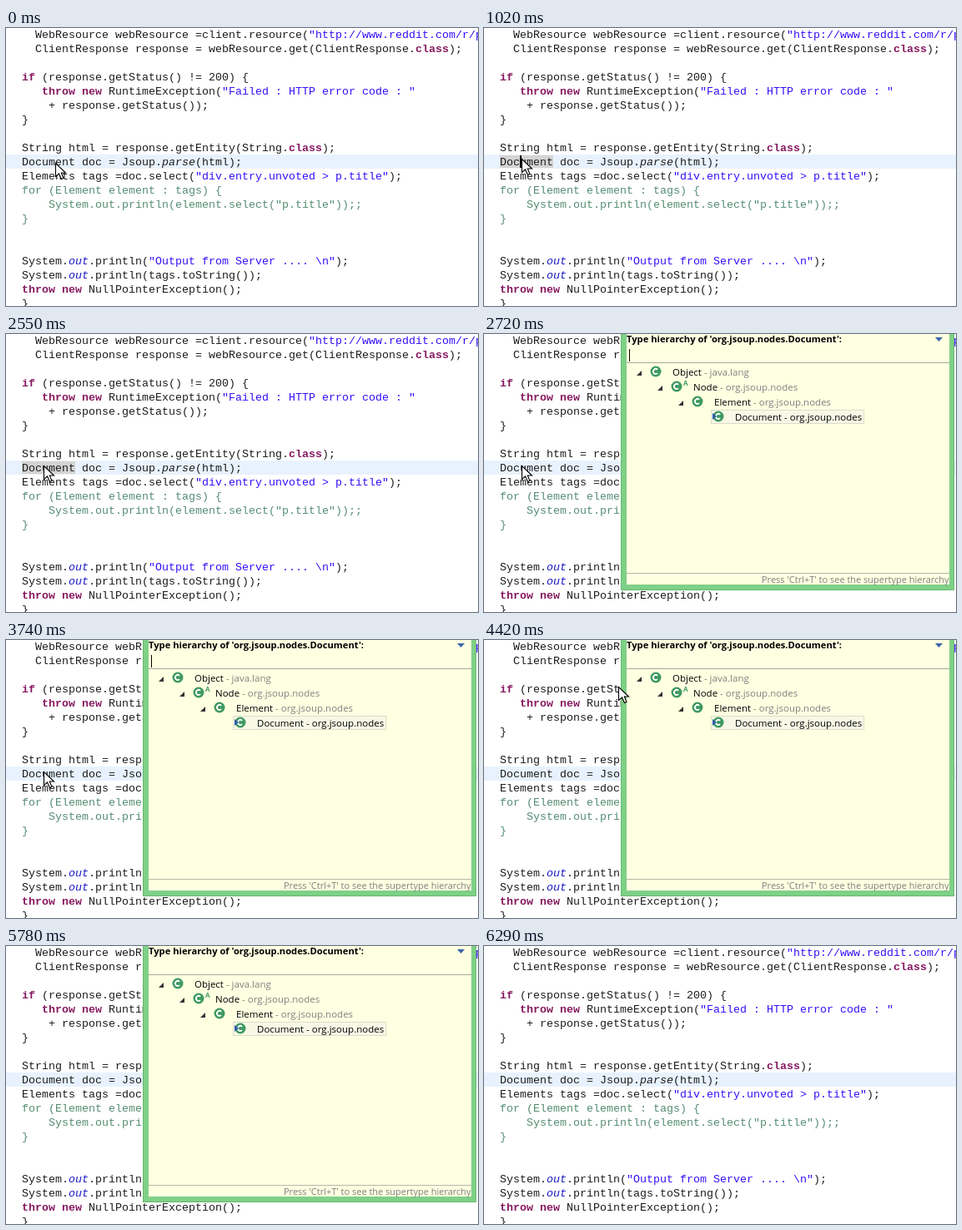
Animation of 566x334 px, one loop 6970 ms. Source, as an HTML page with a canvas:

```html
<!DOCTYPE html>
<html lang="en">
<head>
<meta charset="utf-8">
<title>Type hierarchy popup</title>
<style>
  html, body { margin: 0; width: 100%; height: 100%; overflow: hidden; background: #fff; }
  canvas { display: block; }
</style>
</head>
<body>
<canvas width="566" height="334"></canvas>
<script>
const ctx = document.querySelector('canvas').getContext('2d');
const LOOP = 6970, STEP = 170, ROW = 17, CHAR = 8;
const CLICK = 600, MARK = 1020, OPEN = 2720, CLOSE = 6120;
const MONO = '13.333px "Liberation Mono", monospace';
const SANS = '"Open Sans", sans-serif';
const INK = '#1c1c1c', KEYWORD = '#86195f', STRING = '#3310f8', STATIC = '#1c1cc4', COMMENT = '#558c73';

const code = String.raw`  WebResource webResource =client.resource("http://www.reddit.com/r/p
  ClientResponse response = webResource.get(ClientResponse.class);

if (response.getStatus() != 200) {
   throw new RuntimeException("Failed : HTTP error code : "
    + response.getStatus());
}

String html = response.getEntity(String.class);
Document doc = Jsoup.parse(html);
Elements tags =doc.select("div.entry.unvoted > p.title");
for (Element element : tags) {
    System.out.println(element.select("p.title"));;
}


System.out.println("Output from Server .... \n");
System.out.println(tags.toString());
throw new NullPointerException();
}`.split('\n');
const tokens = /"[^"]*"?|\b(?:if|throw|new|class|out|parse)\b|[^"\s\w]+|\w+/g;

const tree = [
  ['Object', 'java.lang'],
  ['Node', 'org.jsoup.nodes'],
  ['Element', 'org.jsoup.nodes'],
  ['Document', 'org.jsoup.nodes']
];

// time, x, y of the pointer tip
const track = [
  [0, 59, 162], [170, 59, 162], [680, 45, 157], [2720, 45, 158], [3740, 45, 158],
  [4760, 201, 20], [5270, 230, 105], [5610, 195, 340], [LOOP, 195, 340]
];

function rect(color, x, y, w, h) {
  ctx.fillStyle = color;
  ctx.fillRect(x, y, w, h);
}

function text(str, x, y, color, font) {
  ctx.font = font;
  ctx.fillStyle = color;
  ctx.fillText(str, x, y);
  return x + ctx.measureText(str).width;
}

function polygon(color, x, y, points) {
  ctx.beginPath();
  for (let i = 0; i < points.length; i += 2) ctx.lineTo(x + points[i], y + points[i + 1]);
  ctx.closePath();
  ctx.fillStyle = color;
  ctx.fill();
}

function pointerAt(t) {
  const i = track.findIndex(p => p[0] > t);
  const [t0, x0, y0] = track[i - 1], [t1, x1, y1] = track[i];
  const u = (t - t0) / (t1 - t0), k = u * u * (3 - 2 * u);
  return { x: Math.round(x0 + (x1 - x0) * k), y: Math.round(y0 + (y1 - y0) * k) };
}

const caretOn = (t, start) => t >= start && (t - start) % 1060 < 530;

function tokenStyle(token) {
  if (token[0] === '"') return [STRING, ''];
  if (/^(if|throw|new|class)$/.test(token)) return [KEYWORD, 'bold '];
  if (token === 'out') return [STATIC, 'italic '];
  return [INK, token === 'parse' ? 'italic ' : ''];
}

function drawCode(t) {
  rect('#e8f2fe', 0, 152, 566, ROW);
  if (t >= MARK && t < OPEN) rect('#d4d4d4', 19, 153, 64, 15);
  code.forEach((line, row) => {
    const comment = row > 10 && row < 14;
    for (const match of line.matchAll(tokens)) {
      const [color, style] = comment ? [COMMENT, ''] : tokenStyle(match[0]);
      text(match[0], 19 + CHAR * match.index, 12 + ROW * row, color, style + MONO);
    }
  });
  if (t < OPEN && caretOn(t, CLICK)) rect('#000', 43, 153, 2, 15);
}

function drawClassIcon(x, y) {
  ctx.beginPath();
  ctx.arc(x, y, 6.5, 0, 7);
  ctx.fillStyle = '#3f9a62';
  ctx.fill();
  ctx.beginPath();
  ctx.arc(x, y, 3, 0.8, 5.5);
  ctx.strokeStyle = '#fff';
  ctx.lineWidth = 1.8;
  ctx.stroke();
}

function drawTreeRow([name, pack], i, selected) {
  const x = 25 * i, y = 18 * i, font = '11.5px ' + SANS;
  if (selected) {
    ctx.font = font;
    const width = 31 + ctx.measureText(name + ' - ' + pack).width;
    rect('#f8f8e6', 197 + x, 38 + y, width, 16);
    ctx.strokeStyle = '#dcdccb';
    ctx.lineWidth = 1;
    ctx.strokeRect(197.5 + x, 37.5 + y, width, 16);
  }
  if (i < 3) polygon('#333', 183 + x, 44 + y, [6, 0, 6, 6, 0, 6]);
  drawClassIcon(206 + x, 45 + y);
  if (i === 1) text('A', 239, 62, '#3f9a62', 'bold 8px ' + SANS);
  if (i === 3) polygon('#2f5fa8', 274, 95, [0, 0, 5, 4, 0, 8]);
  const end = text(name, 226 + x, 50 + y, '#000', font);
  text(' - ' + pack, end, 50 + y, selected ? '#000' : '#808080', font);
}

function drawPopup(t, pointer) {
  rect('#68b873', 164, 0, 400, 308);
  rect('#7fd087', 165, 0, 398, 307);
  rect('#ffffe1', 171, 0, 387, 301);
  text("Type hierarchy of 'org.jsoup.nodes.Document':", 171, 10, '#000', 'bold 11.2px ' + SANS);
  polygon('#3b66a8', 541, 4, [0, 0, 9, 0, 4.5, 5]);
  rect('#a8a89c', 171, 34, 387, 1);
  rect('#b8b8aa', 171, 287, 387, 1);
  if (caretOn(t, 2620)) rect('#000', 174, 18, 1, 15);
  const hovered = Math.max(0, Math.min(3, Math.floor((pointer.y - 37) / 18)));
  const selected = pointer.x < 165 ? 3 : hovered;
  tree.forEach((item, i) => drawTreeRow(item, i, i === selected));
  text("Press 'Ctrl+T' to see the supertype hierarchy", 333, 299, '#808080', '11px ' + SANS);
}

function drawPointer({ x, y }) {
  const arrow = [0, 0, 0, 16, 4, 12.5, 7, 19, 9.5, 18, 6.8, 11.5, 12, 11.5];
  polygon('#fff', x + 0.5, y + 0.5, arrow);
  ctx.strokeStyle = '#000';
  ctx.lineWidth = 1.1;
  ctx.stroke();
}

function frame(now) {
  const t = Math.floor(now % LOOP / STEP) * STEP;
  const pointer = pointerAt(t);
  rect('#fff', 0, 0, 566, 334);
  drawCode(t);
  if (t >= OPEN && t < CLOSE) drawPopup(t, pointer);
  drawPointer(pointer);
  requestAnimationFrame(frame);
}
requestAnimationFrame(frame);
</script>
</body>
</html>
```
